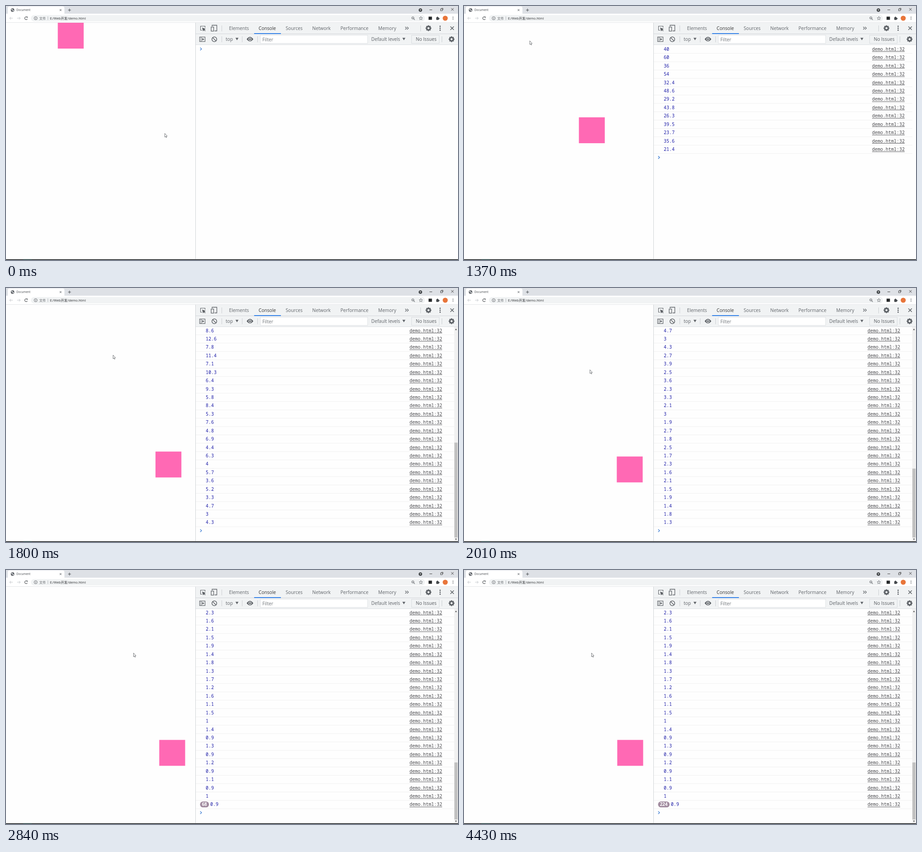
Write an HTML page with a canvas that moves like this. It is 998 by 561 pixels and loops after 4500 ms.

```html
<!DOCTYPE html>
<html lang="zh">
<head>
<meta charset="utf-8">
<title>Document</title>
<style>
html, body { margin: 0; width: 100%; height: 100%; overflow: hidden; background: #fff; }
canvas { display: block; }
</style>
</head>
<body>
<canvas id="stage" width="998" height="561"></canvas>
<script>
const g = document.getElementById('stage').getContext('2d');
const UI = '"Open Sans", "Noto Sans CJK SC", "Noto Sans CJK", sans-serif';
const MONO = '"Noto Sans Mono", "DejaVu Sans Mono", monospace';
const GREY = '#5f6368', DARK = '#45494d', TAU = Math.PI * 2;

// ---------- timing: the screen refreshes in steps ----------
const LOOP = 4500, REST = 330, CLICK = 1100, GO = 1230, STEP = 69.6;
const stepOf = t => Math.floor((t - GO + 10) / STEP);

function smooth(t, a, b) {
  const u = Math.min(1, Math.max(0, (t - a) / (b - a)));
  return u * u * (3 - 2 * u);
}

function track(keys, t) {
  for (let i = 1; i < keys.length; i++) {
    const [a, va] = keys[i - 1], [b, vb] = keys[i];
    if (t <= b) return Math.floor(va + (vb - va) * (t - a) / (b - a));
  }
  return keys[keys.length - 1][1];
}

// Totals reached at a few steps after the click
const LOGS = [[0, 0], [4, 26], [11, 75], [23, 158], [33, 228], [46, 314]];
const TICKS = [[0, 2], [4, 16], [11, 40], [14, 47]];

// ---------- motion model: each tick covers a tenth of the remaining way ----------
const TARGET = 600;
function remaining(first) {
  const r = [first];
  while (r.length < 60) r.push(Math.ceil(r[r.length - 1] * 9 / 10));
  return r;
}
const rest = [remaining(400), remaining(600)];
const place = (r, n) => n < 1 ? TARGET - r[0] : TARGET - 0.9 * r[n - 1];

// ---------- drawing helpers ----------
function rect(x, y, w, h, c) {
  g.fillStyle = c;
  g.fillRect(x, y, w, h);
}
function round(x, y, w, h, r, c) {
  g.fillStyle = c;
  g.beginPath();
  g.roundRect(x, y, w, h, r);
  g.fill();
}
function box(x, y, w, h, c, lw = 1) {
  g.strokeStyle = c;
  g.lineWidth = lw;
  g.strokeRect(x, y, w, h);
}
function disc(x, y, r, c) {
  g.fillStyle = c;
  g.beginPath();
  g.arc(x, y, r, 0, TAU);
  g.fill();
}
function ring(x, y, r, c, lw = 1, a = 0, b = TAU) {
  g.strokeStyle = c;
  g.lineWidth = lw;
  g.beginPath();
  g.arc(x, y, r, a, b);
  g.stroke();
}
function path(pts) {
  g.beginPath();
  for (let i = 0; i < pts.length; i += 2) g.lineTo(pts[i], pts[i + 1]);
}
function line(pts, c, lw = 1) {
  path(pts);
  g.strokeStyle = c;
  g.lineWidth = lw;
  g.stroke();
}
function poly(pts, c) {
  path(pts);
  g.closePath();
  g.fillStyle = c;
  g.fill();
}
function text(s, x, cy, size, c, font = UI, weight = 400) {
  g.font = `${weight} ${size}px ${font}`;
  g.fillStyle = c;
  g.fillText(s, x, cy + size * 0.36);
}
function cross(x, y, r, c, lw) {
  line([x - r, y - r, x + r, y + r], c, lw);
  line([x - r, y + r, x + r, y - r], c, lw);
}
function dots(x, y, gap, r, c) {
  for (let i = -1; i < 2; i++) disc(x, y + i * gap, r, c);
}
// Triangle pointing down (d = 1) or up (d = -1)
function tri(x, y, r, d, c) {
  poly([x - r, y - r * 0.85 * d, x + r, y - r * 0.85 * d, x, y + r * 0.85 * d], c);
}
function chevron(x, y, r, d, c, lw) {
  line([x, y - r, x + d * r, y, x, y + r], c, lw);
}
function gear(x, y, r, c) {
  ring(x, y, r * 0.6, c, r * 0.48);
  for (let i = 0; i < 8; i++) {
    const a = i * TAU / 8, u = Math.cos(a), v = Math.sin(a);
    line([x + u * r * 0.6, y + v * r * 0.6, x + u * r, y + v * r], c, r * 0.42);
  }
}
function arrow(x, y, d, c) {
  line([x - 3.5, y, x + 3.5, y], c, 0.9);
  chevron(x + d * 0.5, y, 3, d, c, 0.9);
}
function star(x, y, r, c) {
  const pts = [];
  for (let i = 0; i < 11; i++) {
    const a = i * TAU / 10 - TAU / 4, k = i % 2 ? r * 0.45 : r;
    pts.push(x + k * Math.cos(a), y + k * Math.sin(a));
  }
  line(pts, c, 0.8);
}

// ---------- browser window ----------
function drawBrowser() {
  rect(0, 0, 998, 18, '#dee1e6');
  round(4, 1, 125, 18, [4, 4, 0, 0], '#fff');
  rect(0, 17, 998, 19, '#fff');
  rect(0, 36, 998, 1, '#e3e5e8');

  disc(14.5, 9, 3.9, GREY);
  disc(13.4, 7.8, 1.4, '#e8eaed');
  disc(15.9, 10.2, 1.3, '#e8eaed');
  text('Document', 23, 9.2, 6.35, DARK);
  cross(120.5, 9, 2, DARK, 0.9);
  rect(137, 8.5, 6.4, 1, DARK);
  rect(139.7, 5.8, 1, 6.4, DARK);

  disc(915, 9, 3.8, '#3c4043');
  tri(915, 9.2, 1.6, 1, '#fff');
  rect(935, 8, 6, 0.9, '#333');
  box(959.5, 6.5, 4, 4, '#333', 0.8);
  line([961, 5, 965, 5, 965, 9], '#333', 0.8);
  cross(985.7, 7.5, 2.7, '#333', 0.9);

  arrow(11.5, 27, -1, '#bdc1c6');
  arrow(28, 27, 1, '#bdc1c6');
  ring(44.5, 27, 3.1, DARK, 1.1, 0.5, TAU - 0.7);
  tri(46.8, 25.2, 1.6, 1, DARK);

  round(55, 20, 870, 14, 7, '#f1f3f4');
  ring(65.5, 27, 3.5, GREY, 0.9);
  rect(65, 26.5, 1, 2.6, GREY);
  rect(65, 24.8, 1, 1, GREY);
  text('文件', 73.5, 27, 7.2, GREY);
  rect(92, 23, 0.8, 8, '#a5a9ae');
  text('E:/Web开发/demo.html', 97, 27, 7.35, '#2b2e31');

  ring(898.3, 26.3, 2.5, GREY, 1);
  line([900.2, 28.2, 902.6, 30.6], GREY, 1.2);
  rect(897, 26, 2.6, 0.7, GREY);
  star(916, 27.2, 4, GREY);

  rect(933, 23.5, 7.5, 7, '#26282a');
  round(950, 25, 5.6, 5.8, 0.8, DARK);
  disc(952.6, 24.8, 1.4, DARK);
  disc(956, 27.8, 1.4, DARK);
  disc(969.8, 27, 5.6, '#e8753a');
  dots(987, 27, 2.6, 0.8, DARK);
}

// ---------- developer tools ----------
function drawTabs() {
  let x = 492.5;
  for (const s of ['Elements', 'Console', 'Sources', 'Network', 'Performance', 'Memory']) {
    const on = s === 'Console';
    text(s, x, 49.5, 10.2, on ? '#333' : GREY);
    const w = g.measureText(s).width;
    if (on) rect(x - 10, 60, w + 21, 1.7, '#1a73e8');
    x += w + 21.5;
  }
}

function drawEye(x, y) {
  g.fillStyle = GREY;
  g.beginPath();
  g.moveTo(x - 7.4, y);
  g.quadraticCurveTo(x, y - 9.8, x + 7.4, y);
  g.quadraticCurveTo(x, y + 9.8, x - 7.4, y);
  g.fill();
  disc(x, y, 3.2, '#f1f3f4');
  disc(x, y, 2, GREY);
}

function drawTools() {
  rect(418, 37, 1, 522, '#d0d3d7');
  rect(419, 37, 579, 49, '#f1f3f4');
  rect(419, 61, 579, 1, '#d3d6da');
  rect(419, 85, 579, 1, '#dcdfe3');
  for (const x of [476, 915]) rect(x, 43, 1, 13, '#cbced2');
  for (const x of [476, 521, 555, 962]) rect(x, 67, 1, 13, '#cbced2');

  line([433, 53.5, 429.5, 53.5, 429.5, 44.5, 439.5, 44.5, 439.5, 48], GREY, 1.1);
  poly([433, 47.5, 440.8, 50.6, 435, 55.8], GREY);
  line([437, 52, 440, 55.3], GREY, 1.5);
  line([455, 45, 455, 42.5, 465.5, 42.5, 465.5, 55, 460.5, 55], GREY, 1.3);
  box(453, 46.5, 5.5, 9, GREY, 1.3);
  drawTabs();
  for (const x of [881.5, 885.5]) chevron(x, 49, 3, 1, GREY, 1.2);
  gear(932.8, 49, 6.4, GREY);
  dots(958.5, 49, 4.3, 1.5, GREY);
  cross(985, 49, 3.8, GREY, 1.6);

  box(427.5, 68.5, 12, 10, GREY, 1.2);
  rect(430.2, 68.5, 1.1, 10, GREY);
  poly([433.2, 70.5, 437.8, 73.5, 433.2, 76.5], GREY);
  ring(460, 73.5, 5.3, GREY, 1.5);
  line([456.3, 69.8, 463.7, 77.2], GREY, 1.5);
  text('top', 485, 73.8, 10.2, GREY);
  tri(510, 73, 3.3, 1, GREY);
  drawEye(538.7, 73.2);

  rect(561, 64, 238, 19, '#fff');
  box(561.5, 64.5, 237, 18, '#e0e2e5');
  text('Filter', 566, 74, 10.2, '#70757a');
  text('Default levels', 806.5, 73.8, 10.2, GREY);
  tri(878.5, 73, 3.3, 1, GREY);
  box(895.5, 64.5, 61, 18, '#d9dce0');
  text('No Issues', 904.7, 73.8, 10.2, '#55595d');
  gear(983.8, 73.3, 6.4, GREY);
}

// ---------- console output ----------
const TOP = 86, VIEW = 473, PITCH = 18.43, MAX_ROWS = 91;

function drawRow(i, cy, right, repeat) {
  let x = 441;
  if (repeat > 1) {
    const n = String(repeat), w = 8.2 + 5.8 * n.length;
    round(428.4, cy - 6.5, w, 13, 6.5, '#a18b9f');
    text(n, 432.4, cy, 10, '#fff', UI, 700);
    x = 428.4 + w + 2.8;
  }
  text(String(rest[i & 1][i >> 1] / 10), x, cy, 10, '#1a1aa6', MONO);
  text('demo.html:32', right - 72, cy, 10, '#4a4a4e', MONO);
  rect(right - 72, cy + 5, 72, 0.9, '#4a4a4e');
  rect(419, cy + 8.8, 571, 1, '#f0f0f0');
}

function drawConsole(logs) {
  const rows = Math.min(logs, MAX_ROWS);
  const full = rows * PITCH + 32;
  const scroll = Math.max(0, full - VIEW);
  const right = scroll ? 963 : 973;
  g.save();
  g.beginPath();
  g.rect(419, TOP, 579, VIEW);
  g.clip();
  for (let i = 0; i < rows; i++) {
    const cy = 95.3 + i * PITCH - scroll;
    if (cy > TOP - PITCH) drawRow(i, cy, right, i === MAX_ROWS - 1 ? logs - i : 1);
  }
  chevron(428.8, 94.9 + rows * PITCH - scroll, 3, 1, '#2f74d0', 1.3);
  if (scroll) {
    const thumb = 455 * VIEW / full;
    rect(989.5, TOP, 8.5, VIEW, '#f1f1f1');
    rect(990, 551 - thumb, 7, thumb, '#c1c1c1');
    tri(993.5, 91.2, 2, -1, '#606060');
    tri(993.5, 555.2, 2, 1, '#606060');
  }
  g.restore();
}

// ---------- page ----------
function drawSquare(n) {
  const k = 998 / 1920;
  const [x, y] = rest.map(r => Math.round(place(r, n) * 1.1) * k);
  rect(x, 71 * k + y, 110 * k, 110 * k, '#ff69b4');
}

function pointer(t, step) {
  if (step >= 0) {
    const s = smooth(step, 1.6, 12);
    return [144 + 137 * s, 76 + 107 * s];
  }
  const s = smooth(t, 280, 925);
  return [350 - 206 * s, 281 - 205 * (s + 0.2 * s * (1 - s))];
}

function drawPointer(x, y) {
  g.save();
  g.translate(x, y);
  poly([0.6, 0.4, 0.6, 8.6, 2.4, 7, 3.7, 9.7, 4.9, 9.1, 3.7, 6.5, 6, 6.3], '#fff');
  g.strokeStyle = '#55585c';
  g.lineWidth = 0.8;
  g.stroke();
  g.restore();
}

function draw(t) {
  const step = t < GO ? -1 : stepOf(t);
  if (step < 0) t = t < REST ? 0 : Math.min(CLICK, REST + Math.floor((t - REST) / 70) * 70);
  rect(0, 0, 998, 561, '#fefefe');
  drawSquare(step < 0 ? 0 : track(TICKS, step));
  drawBrowser();
  drawTools();
  drawConsole(step < 0 ? 0 : track(LOGS, step));
  if (t === CLICK) disc(144.5, 76, 6.4, 'rgba(255,183,50,0.85)');
  drawPointer(...pointer(t, step));
  rect(0, 559.5, 998, 1.5, '#0c0f10');
  rect(38, 559.5, 19, 1.5, '#2f4a4c');
}

const origin = performance.now();
function tick() {
  draw((performance.now() - origin) % LOOP);
  requestAnimationFrame(tick);
}
tick();
</script>
</body>
</html>
```
